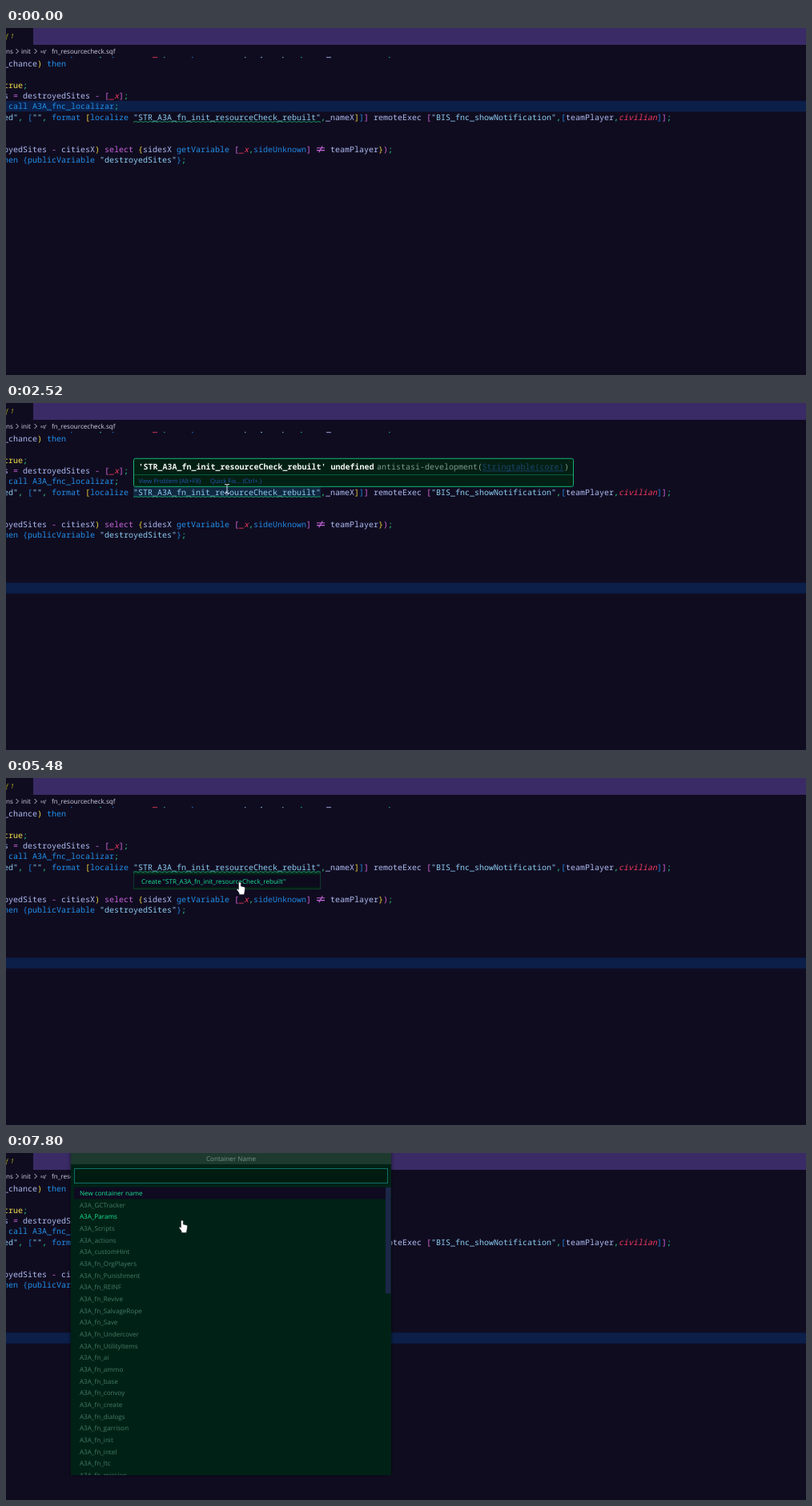
An HTML page for the animation above (8000 ms loop, 999 by 433 pixels).

```html
<!DOCTYPE html>
<html lang="en">
<head>
<meta charset="utf-8">
<title>Code editor quick fix</title>
<style>
html, body { margin: 0; width: 100%; height: 100%; overflow: hidden; background: #100c20; }
svg { display: block; width: 999px; height: 433px; }
text { white-space: pre; text-rendering: geometricPrecision; }
.code { font: 500 10px "Noto Sans Mono", "DejaVu Sans Mono", monospace; font-variant-ligatures: none; }
.ui { font: 8.1px "Open Sans", "Noto Sans", sans-serif; }
.it { font-style: italic; }
</style>
</head>
<body>
<svg id="stage" viewBox="0 0 999 433" xmlns="http://www.w3.org/2000/svg">
  <defs>
    <filter id="shadow" x="-5%" y="-5%" width="110%" height="110%">
      <feDropShadow dx="0" dy="0" stdDeviation="2.5" flood-color="#000" flood-opacity=".6"/>
    </filter>
    <clipPath id="listClip"><rect x="81" y="38" width="400" height="364"/></clipPath>
  </defs>
  <rect width="999" height="433" fill="#100c20"/>
  <rect id="lineMark" width="999" height="13.4" fill="#0b1f49"/>
  <rect id="wordMark" x="159" y="104.6" width="234" height="13.3" fill="#10283f"/>
  <g id="code" class="code"></g>
  <g id="scraps"></g>
  <path id="squiggle" fill="none" stroke="#17a063" stroke-width=".9"/>
  <rect width="999" height="21" fill="#3a2b66"/>
  <rect width="34" height="22" fill="#100c20"/>
  <text class="ui it" x="-1" y="13" fill="#a3a51c">ƒ 1</text>
  <g class="ui" fill="#d3cfe4">
    <text x="0" y="32">ns</text>
    <text x="19" y="32">init</text>
    <text x="57" y="32">fn_resourcecheck.sqf</text>
    <text class="it" x="43" y="30.5" style="font-size:5.2px">sqf</text>
    <path d="M12.5 26l3 3-3 3M35.500 26l3 3-3 3" fill="none" stroke="#d3cfe4" stroke-width=".9"/>
  </g>

  <g id="hover">
    <rect x="159.500" y="69.300" width="549" height="35" rx="2" fill="#021f13" stroke="#13b274"/>
    <path d="M160 89.600H708" stroke="#0d6e49" stroke-width=".8"/>
    <g class="code">
      <text x="165.500" y="82.500" fill="#f2f6f4" font-weight="700">'STR_A3A_fn_init_resourceCheck_rebuilt' undefined</text>
      <text x="463" y="82.500" fill="#7d9a8e">antistasi-development(</text>
      <text x="594.500" y="82.500" fill="#1c4673">Stringtable(core)</text>
      <text x="697" y="82.500" fill="#7d9a8e">)</text>
      <path d="M595 84.800H697" stroke="#1c4673" stroke-width=".8"/>
    </g>
    <g class="ui" style="font-size:7.7px" fill="#2856b4">
      <text x="165.500" y="100">View Problem (Alt+F8)</text>
      <text x="255" y="100">Quick Fix... (Ctrl+.)</text>
    </g>
  </g>

  <g id="menu">
    <rect x="159.500" y="118.500" width="233" height="20" fill="#021f13" stroke="#0d3b2a"/>
    <rect x="160" y="121" width="232" height="15" fill="#0d0a1e"/>
    <text class="ui" x="169" y="131.500" fill="#17e594">Create "STR_A3A_fn_init_resourceCheck_rebuilt"</text>
  </g>

  <g id="picker">
    <rect id="panel" x="81" y="-6" width="400" fill="#002112" filter="url(#shadow)"/>
    <rect x="81" width="400" height="14" fill="#1e392e"/>
    <text class="ui" x="281" y="9.500" text-anchor="middle" fill="#76958a">Container Name</text>
    <rect x="85.500" y="19.500" width="391" height="18" fill="#001c10" stroke="#136f68"/>
    <path id="caret" d="M90 22V34" stroke="#1fcf8c"/>
    <g id="list" class="ui" clip-path="url(#listClip)">
      <rect x="85" y="42.700" width="392" height="14.700" fill="#0f0a20"/>
      <rect id="bar" x="474" y="42.700" width="6.500" height="132.500" fill="#1b2748"/>
    </g>
  </g>

  <circle id="press" r="7.800" fill="#b5a31c" fill-opacity=".85"/>
  <path id="beam" d="M-3-5.500H-1Q0-5.500 0-4.500Q0-5.500 1-5.500H3M0-4.500V4.500M-3 5.500H-1Q0 5.500 0 4.500Q0 5.500 1 5.500H3"
    fill="none" stroke="#e4e2ee" stroke-width=".9"/>
  <path id="hand" d="M-1.500 1Q-1.500 0 0 0T1.300 1V5L5.500 6Q6.600 6.300 6.500 7.500L6 12L5.200 15.500H-.5L-1.200 13L-3.700 9.500Q-3.900 8.200-2.700 8.300L-1.500 9.300Z"
    fill="#fff" stroke="#1a1626" stroke-width=".5"/>
</svg>
<script>
const $ = id => document.getElementById(id);
const LOOP = 8000, STEP = 40, COL = 6, LEFT = -3, ROW = 13.333, ROW0 = 44.5, ITEM = 14.66;

function add(parent, tag, attrs, text) {
  const el = document.createElementNS("http://www.w3.org/2000/svg", tag);
  for (const k in attrs) el.setAttribute(k, attrs[k]);
  if (text) el.textContent = text;
  parent.appendChild(el);
  return el;
}

const ink = {
  v: "#aebcf2", k: "#2190ea", s: "#8ccdf2", o: "#c765dc", r: "#f23a5c",
  y: "#f0d43c", p: "#d268d8", b: "#1f86e0", g: "#25d687", t: "#f4e04c"
};
// Each line is a run of "ink:text" pieces split by a bar.
const lines = {
  0: "v:_chance|y:)|k: then",
  2: "t:true|g:;",
  3: "v:s |o:= |v:destroyedSites |o:- |p:[|r:_x|p:]|g:;",
  4: "k: call A3A_fnc_localizar|g:;",
  5: 's:ed"|g:, |b:[|s:""|g:, |k:format |y:[|k:localize |s:"STR_A3A_fn_init_resourceCheck_rebuilt"|g:,' +
     '|v:_nameX|y:]|b:]|p:] |v:remoteExec |p:[|s:"BIS_fnc_showNotification"|g:,|b:[|v:teamPlayer|g:,|r:civilian|b:]|p:]|g:;',
  8: "v:oyedSites |o:- |v:citiesX|y:) |o:select |y:{|v:sidesX |k:getVariable |p:[|r:_x|g:,|b:sideUnknown|p:]    " +
     "|v:teamPlayer|y:}|p:)|g:;",
  9: 'k:hen |b:{|k:publicVariable |s:"destroyedSites"|b:}|g:;'
};
for (const row in lines) {
  let x = LEFT;
  for (const piece of lines[row].split("|")) {
    const c = piece[0], str = piece.slice(2);
    add($("code"), "text", { x, y: ROW0 + row * ROW + 3.4, fill: ink[c], class: c === "r" ? "it" : "" }, str);
    x += str.length * COL;
  }
}
// wide not-equal sign
add($("code"), "path", { d: "M388 149.800H398M388 152.600H398M395.300 147.300L390.700 155.200", stroke: ink.o, "stroke-width": 1.1 });

// tails of the line hidden under the path bar
[[81, 1.5, "b"], [117, 2, "g"], [133, 1.5, "k"], [183, 6, "r"], [197, 1.5, "g"], [232, 1.5, "k"], [298, 1.5, "s"],
 [318, 2, "s"], [345, 1.5, "s"], [368, 1.5, "g"], [400, 6, "v"], [478, 1.5, "g"]]
  .forEach(([x, width, c]) => add($("scraps"), "rect", { x, y: 36, width, height: 1.2, fill: ink[c], opacity: .7 }));

let wave = "M159 117.500";
for (let i = 0; i < 78; i++) wave += `l3 ${i % 2 ? 1 : -1}`;
$("squiggle").setAttribute("d", wave);

const names = ["New container name", ..."GCTracker Params Scripts actions customHint".split(" ").map(n => "A3A_" + n),
  ...("OrgPlayers Punishment REINF Revive SalvageRope Save Undercover UtilityItems ai ammo base convoy " +
  "create dialogs garrison init intel ltc mission").split(" ").map(n => "A3A_fn_" + n)];
const items = names.map((n, i) => add($("list"), "text", { x: 92, y: 53 + i * ITEM }, n));

// pointer stops: time, x, y
const stops = [
  [360, 815, 411], [440, 808, 408], [800, 808, 408], [1600, 286, 101], [1640, 286, 101], [1720, 282, 99],
  [1840, 282, 99], [1920, 276, 106], [2160, 276, 106], [2200, 276, 107], [3520, 276, 107], [3760, 280, 96.5],
  [5320, 280, 96.5], [5480, 291, 132.5], [7160, 291, 132.5], [7560, 218, 86], [7680, 218, 86], [7720, 219, 86.5]
];
function pointer(t) {
  const i = stops.findIndex(s => s[0] > t);
  if (i < 0) return stops[stops.length - 1].slice(1);
  if (!i) return stops[0].slice(1);
  const [t0, x0, y0] = stops[i - 1], [t1, x1, y1] = stops[i];
  const p = (t - t0) / (t1 - t0), e = p * p * (3 - 2 * p);
  return [x0 + (x1 - x0) * e, y0 + (y1 - y0) * e];
}

const within = (t, a, b) => t >= a && t < b;
const show = (id, on) => $(id).setAttribute("visibility", on ? "inherit" : "hidden");
const place = (id, x, y) => $(id).setAttribute("transform", `translate(${x} ${y})`);

function draw(ms) {
  const t = Math.floor(ms / STEP) * STEP;
  const [x, y] = pointer(t);
  const hand = t >= 3640, full = t >= 6280;

  $("lineMark").setAttribute("y", ROW0 + (t < 1000 ? 4 : 14) * ROW - 6.9);

  const hover = within(t, 2440, 4920);
  show("hover", hover);
  show("wordMark", hover);
  $("hover").setAttribute("opacity", Math.min(1, (t - 2400) / 120));
  show("menu", within(t, 4920, 5600));

  show("picker", t >= 6120);
  $("panel").setAttribute("height", full ? 408 : 52);
  show("list", full);
  show("caret", within(t, 6240, 6800) || within(t, 7320, 7800));
  $("bar").setAttribute("opacity", t < 6360 ? .4 : t < 6400 ? .75 : 1);
  const over = Math.floor((y - 2.5 - 42.7) / ITEM);
  items.forEach((el, i) => el.setAttribute("fill", i === 0 || i === over ? "#17e594" : "#467b66"));

  show("beam", t >= 360 && !hand);
  show("hand", hand);
  show("press", within(t, 4800, 4920) || within(t, 5520, 5600));
  place("beam", x, y);
  place("hand", x + 1, y - 2.5);
  place("press", x, y);
}

const start = performance.now();
function tick() {
  draw((performance.now() - start) % LOOP);
  requestAnimationFrame(tick);
}
draw(0);
requestAnimationFrame(tick);
</script>
</body>
</html>
```
